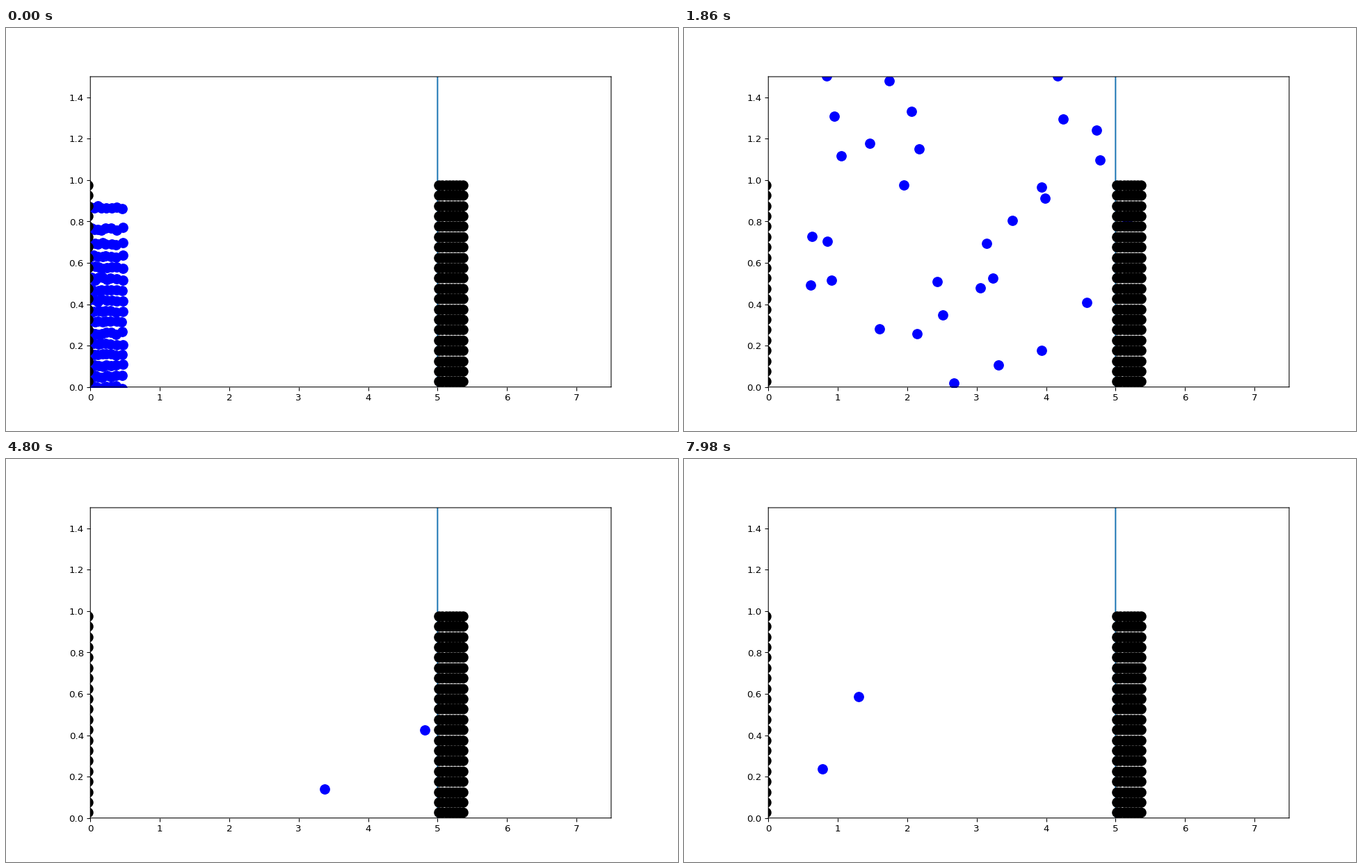
Animation of 966x580 px, one loop 8000 ms. Source, as a matplotlib script:

```python
import math
import random

import matplotlib.pyplot as plt
import numpy as np
from matplotlib.animation import FuncAnimation

W, H, DPI = 966, 580, 96.6
LOOP_MS, TICK_MS, STEP_MS = 8000, 20, 60
STEPS = -(-LOOP_MS // STEP_MS)
GRAVITY = 0.03                      # half acceleration, px per step^2
TOP, BOTTOM, LEFT, RIGHT = 55, 530, 105, 885
ROWS, COLS = 16, 8
BURST = 21                          # step at which the burst has spread out
SURVIVORS = 41

rng = random.Random(4)

# Knots (step, x, y) of the particles that bounce around the longest.
bouncers = [
    [(BURST, 214, 455), (47, 387, 411), (78.8, 611, 389.5),
     (129, 233, 482), (133, 199, 446)],
    [(BURST, 248, 459), (47, 475, 421), (73, 528, 481.5),
     (113, 129, 482.4), (126, 190, 384.5), (133, 250.5, 342.5)],
    [(BURST, 138, 350), (47, 257, 233), (70, 371, 260), (79, 430, TOP)],
]


def packed_block():
    """Starting rows, wider apart at the top and right."""
    return [(122 + 5 * c + 0.03 * c ** 3 + rng.uniform(-1, 1),
             517 - 15.6 * r - 25 * (r / 15) ** 14 + rng.uniform(-2, 2))
            for r in range(ROWS) for c in range(COLS)]


def survivor(i):
    """A particle still in view after the burst, then drifting out."""
    x = 130 + 390 * (i * 0.618 % 1) ** 1.6
    y = 90 + 425 * (i + rng.random()) / SURVIVORS
    span = 2 + rng.weibullvariate(19, 1.5)
    if span > 18 and rng.random() < 0.6:
        out = RIGHT, rng.uniform(150, 450)
    else:
        edge = TOP if rng.random() < 0.75 else BOTTOM
        out = x + rng.uniform(3, 8) * span, edge
    return [(BURST, x, y), (BURST + span, *out)]


def lost(x, y):
    """A particle that leaves during the burst."""
    time = rng.uniform(6, 20)
    up = 0.7 * (BOTTOM - y) / (BOTTOM - TOP)
    pick = rng.random()
    if pick < up:
        return [(time, x + rng.uniform(0, 230), TOP)]
    if pick < up + 0.25:
        return [(time, LEFT, y + rng.uniform(-120, 60))]
    return [(time, x + rng.uniform(0, 200), BOTTOM)]


def build_tracks():
    block = packed_block()
    tracks = []
    for knots in bouncers + [survivor(i) for i in range(SURVIVORS)]:
        start = min(block, key=lambda p: math.dist(p, knots[0][1:]))
        block.remove(start)
        tracks.append([(0, *start)] + knots)
    return tracks + [[(0, *p)] + lost(*p) for p in block]


def place(knots, step):
    """Pixel position of a particle, or None once it is gone."""
    for (t0, x0, y0), (t1, x1, y1) in zip(knots, knots[1:]):
        if step <= t1:
            u = (step - t0) / (t1 - t0)
            if t0 == 0:
                u **= 1.4
            fall = GRAVITY * (step - t0) * (step - t1)
            return x0 + (x1 - x0) * u, y0 + (y1 - y0) * u + fall
    return None


# A 1000 x 600 layout shown slightly smaller, lines on half pixels.
plt.rcParams["path.snap"] = False
fig, ax = plt.subplots(figsize=((W + 0.01) / DPI, (H + 0.01) / DPI), dpi=DPI)
fig.subplots_adjust(left=125.5 / 1000, right=900.5 / 1000,
                    bottom=65.5 / 600, top=527.5 / 600)
ax.set_xlim(0, 7.5)
ax.set_ylim(0, 1.5)
ax.axvline(5)
particles, = ax.plot([], [], "bo", ms=10)

# Wall dots sit on whole pixels of the layout.
unit_x, unit_y = 775 / 7.5, 462 / 1.5
wall_x = np.append(-0.025, 5.025 + 0.05 * np.arange(8))
wall_y = 0.025 + 0.05 * np.arange(20)
gx, gy = np.meshgrid(np.floor(wall_x * unit_x + 0.5) / unit_x,
                     np.ceil(wall_y * unit_y - 0.5 - 1e-6) / unit_y)
ax.scatter(gx, gy, s=np.full(gx.size, 100), c="k", linewidths=1, zorder=2)

tracks = build_tracks()
to_data = ax.transData.inverted()


def positions(step):
    pts = [p for p in (place(k, step) for k in tracks) if p]
    return to_data.transform([(x, H - y) for x, y in pts])


path = [positions(step) for step in range(STEPS)]


def update(tick):
    particles.set_data(*path[tick * TICK_MS // STEP_MS].T)
    return particles,


anim = FuncAnimation(fig, update, frames=LOOP_MS // TICK_MS, interval=TICK_MS,
                     repeat=True, repeat_delay=0, cache_frame_data=False)
plt.show()
```
